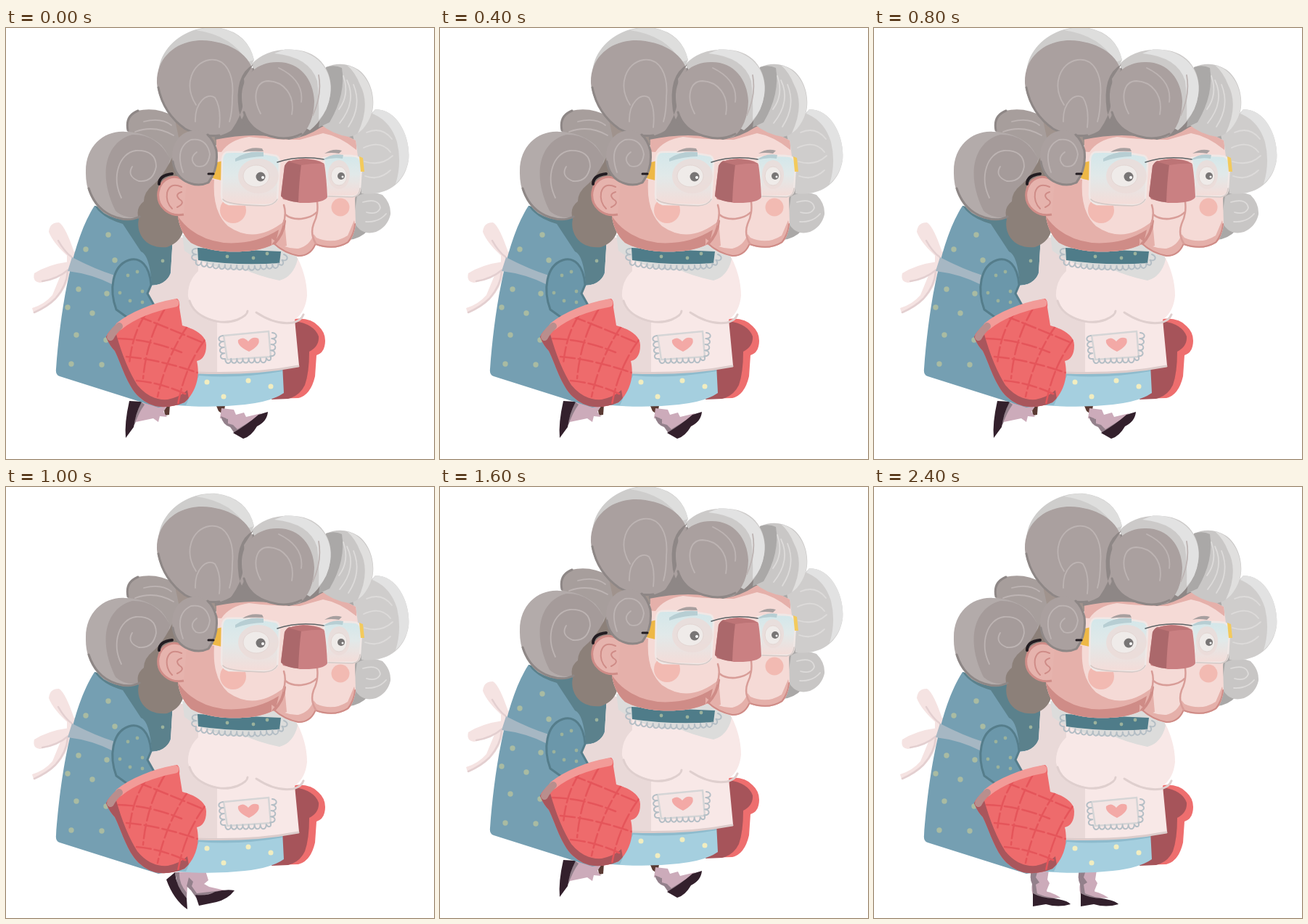
Write an HTML page that moves like this. It is 590 px wide and 594 px high and loops after 4.4 s.

```html
<!DOCTYPE html>
<html lang="en">
<head>
<meta charset="utf-8">
<title>Walking granny</title>
<style>
html, body { margin: 0; width: 100%; height: 100%; overflow: hidden; background: #fff; }
svg { display: block; width: 590px; height: 594px; }
.line { fill: none; stroke-linecap: round; stroke-linejoin: round; }
.curl { stroke: #bdb4b3; stroke-width: 1.8; }
.pale { stroke: #dddbda; stroke-width: 1.8; }
.rim { stroke: #8e8786; stroke-width: 3; }
.shoe { fill: #33202c; }
.sock { fill: #ccabba; }
.sockShade { fill: #93808b; }
.brown { fill: #5a3a33; }
.quilt { stroke: #e5555a; stroke-width: 2.5; stroke-dasharray: 20 5; }
</style>
</head>
<body>
<svg viewBox="0 0 590 594">
<defs>
  <linearGradient id="glass" x2="0" y2="1">
    <stop offset="0" stop-color="#d3e7ea"/>
    <stop offset=".45" stop-color="#e1e9e9"/>
    <stop offset="1" stop-color="#f4dcd8"/>
  </linearGradient>
  <path id="mitt" d="M138 436C146 414 200 390 236 383Q240 386 239 395L243 420C257 424 276 432 276 447Q276 466 263 469C268 490 262 512 246 526Q230 533 213 532Q197 531 183 518C167 503 159 473 150 455Q143 448 138 436Z"/>
  <path id="face" d="M290 158L335 150L440 144L482 165L489 215Q482 230 481 246L482 281Q479 299 472 306Q453 318 427 309Q420 325 403 325Q383 321 369 308C350 318 325 319 302 318Q271 315 255 306Q236 289 236 255L240 210L290 218Z"/>
  <clipPath id="inMitt"><use href="#mitt"/></clipPath>
  <clipPath id="inFace"><use href="#face"/></clipPath>
</defs>

<g id="S">
  <g id="standLeg">
    <path class="sock" d="M217 528H241L239 541L242 546L238 556L240 565H220Q216 555 218 547Q214 539 217 528Z"/>
    <path class="sockShade" d="M217 528H226L223 538L228 545L223 548L225 561H219L218 547Q214 539 217 528Z"/>
    <path class="sock" d="M228 556Q244 557 257 566L224 566Z"/>
    <path class="sockShade" d="M219 557Q235 567 260 567L220 567Z"/>
    <path class="shoe" d="M219 560Q232 567 248 567Q267 570 271 575Q254 580 237 575L219 578Z"/>
  </g>
  <use href="#standLeg" x="66"/>
</g>
<g id="A">
  <path class="brown" d="M217 519H226L225 533L219 534Z"/>
  <path class="sock" d="M184 516L223 520L217 529L222 536L212 535L210 543L203 538L179 543Z"/>
  <path class="sockShade" d="M186 515L191 519Q183 530 178 545L172 554Z"/>
  <path class="shoe" d="M170 514L187 515Q178 533 176 550L165 565Q163 545 170 514Z"/>
  <path class="brown" d="M290 521L302 520L300 533L293 528Z"/>
  <path class="sock" d="M297 524L314 526L317 533L328 530L331 536L352 531L319 558L311 547L304 545L305 538L295 538Z"/>
  <path class="sockShade" d="M296 535L306 539L306 545L313 547L319 553L356 530L316 560L309 550Q299 547 296 535Z"/>
  <path class="shoe" d="M361 529Q360 542 346 549Q338 563 327 566L313 558Q332 547 348 533Z"/>
</g>
<g id="C">
  <path class="sock" d="M190 522L226 520L223 530L225 537L214 534L210 543L205 546L203 565L193 548Z"/>
  <path class="sockShade" d="M190 525L196 524Q194 540 203 554L203 567L191 545Z"/>
  <path class="shoe" d="M178 531L191 525Q190 547 202 563L202 578Q185 565 178 531Z"/>
  <path class="brown" d="M287 525L296 522L298 530L289 531Z"/>
  <path class="sock" d="M285 533L298 527L313 530L309 539L318 543L316 551L336 556L303 567L296 555L290 552L292 544L285 542Z"/>
  <path class="sockShade" d="M285 534L292 533L291 541L299 544L296 552L306 562L330 556L303 566L294 555L289 552L291 544L285 542Z"/>
  <path class="shoe" d="M302 563Q315 564 329 556L354 552Q350 563 337 570L307 578Z"/>
</g>
<g id="B">
  <path class="sock" d="M233 531L275 529L279 542L273 547L280 551L302 556L263 567L256 555L250 551L249 570L239 554Z"/>
  <path class="sockShade" d="M233 531L239 531Q238 546 249 559L249 573L237 551ZM252 538L258 544L256 550L263 560L297 556L262 566L255 556L249 550Z"/>
  <path class="shoe" d="M221 541L233 531Q234 550 249 567L250 582Q231 569 221 541ZM261 562Q277 564 288 558Q303 554 315 556Q306 568 290 572L266 577Z"/>
</g>

<g id="body">
  <!-- bow -->
  <g fill="#f5e3e2">
    <path d="M88 327Q65 307 59 291Q60 278 73 278Q82 283 95 322Z"/>
    <path d="M87 332Q58 336 39 348Q36 360 47 361Q70 357 92 340Z"/>
    <path d="M78 344L88 345Q85 367 70 383Q56 397 38 403L36 396Q53 391 64 378Z"/>
    <path d="M84 322L95 318V340L84 343Z"/>
  </g>
  <path class="line" stroke="#e3cfd0" stroke-width="2.5" d="M72 303Q81 319 91 326M85 345Q84 365 68 383Q57 394 39 402M50 359Q71 356 86 343"/>
  <!-- far mitt -->
  <path fill="#ee6e6e" d="M396 411Q420 408 431 421Q443 432 439 449Q437 458 428 461L426 490Q420 516 403 520L366 521L380 480L401 475Z"/>
  <path fill="#a6545a" d="M398 414Q425 418 431 435Q432 449 418 456Q418 485 412 502Q405 517 389 521L366 522L380 480L402 475Z"/>
  <!-- dress -->
  <path fill="#759fb2" d="M122 255C90 304 75 400 69 480Q68 488 74 490L210 533L265 525L262 420L229 360L230 290Z"/>
  <path fill="#5b818c" d="M122 255Q133 272 161 280L186 318Q198 323 201 364L221 363Q230 350 230 294L165 264Z"/>
  <path fill="#a5cfdf" d="M245 480L381 474L383 513Q366 525 329 529Q285 534 235 530Z"/>
  <path fill="#8ebbcd" d="M247 483Q320 490 381 479V483Q320 494 266 489L248 530L235 530Z"/>
  <path fill="#a6b7c3" d="M91 326Q124 343 150 351L148 364Q119 349 85 345Z"/>
  <!-- apron -->
  <path fill="#f8e8e7" d="M230 297L398 319Q415 350 415 379Q413 401 398 412L404 475Q336 490 258 484L235 440L198 395L195 365Q220 366 227 348Z"/>
  <path fill="#e9d9d8" d="M230 297L265 302V345Q250 359 251 380Q256 406 291 413V485L258 484L235 440L198 395L195 365Q220 366 227 348Z"/>
  <path fill="#dcdcdb" d="M243 295L395 310L402 329Q396 353 377 358Q345 351 330 343Q288 347 246 317Z"/>
  <path fill="#4f7c89" d="M264 313L379 318L377 334Q319 338 265 330Z"/>
  <g class="line" stroke="#dfcfce" stroke-width="3">
    <path d="M253 386C260 410 296 421 319 412Q333 406 333 400M345 402Q372 420 396 416Q407 413 410 405"/>
    <path stroke="#dccccb" d="M264 485Q340 488 403 476"/>
  </g>
  <path fill="#f4e5e4" stroke="#d5d5d6" stroke-width="2.5" d="M300 434L362 428L365 463L305 467Z"/>
  <path fill="#f3a9a6" d="M335 456Q318 448 320 440Q327 434 334 442Q340 434 348 438Q352 447 335 456Z"/>
  <g id="lace" class="line" stroke="#b4bec5" stroke-width="2">
    <path d="M263 314L262 331L294 336L340 338L379 334L383 322"/>
    <path d="M299 434L302 466L364 465L367 430"/>
  </g>
  <!-- arm and near mitt -->
  <path fill="#6b97aa" stroke="#557d8b" stroke-width="3" d="M200 364C198 337 185 325 169 330C146 338 142 371 152 398L170 411L204 392L195 376Z"/>
  <g id="dots"></g>
  <use href="#mitt" fill="#ee6b6c"/>
  <g clip-path="url(#inMitt)">
    <path fill="#a9565c" d="M130 435L152 432Q164 475 181 502Q199 524 223 522Q241 518 250 509L255 539H180Z"/>
    <g class="line quilt">
      <path d="M155 438Q198 439 242 457M166 463Q212 467 264 485M181 407Q218 421 272 444M180 496Q215 499 251 516"/>
      <path d="M193 404Q174 431 170 473M220 395Q194 438 189 493M250 421Q221 463 209 518M274 440Q246 478 237 529"/>
    </g>
  </g>
  <path class="line" stroke="#f29b98" stroke-width="11" d="M156 421C174 406 205 394 233 389"/>
  <path class="line" stroke="#b98e8d" stroke-width="10" d="M144 436Q148 428 156 421"/>
  <!-- back hair -->
  <path fill="#a0938d" d="M180 140L240 125L300 155L250 235H190Z"/>
  <path fill="#a79e9c" d="M168 152Q163 132 181 124Q208 118 232 132L247 203L215 230L190 250Z"/>
  <path fill="#b3abaa" d="M110 207C110 172 136 151 164 153Q192 153 214 171Q236 196 221 222Q200 239 185 270Q159 280 135 265Q109 244 110 207Z"/>
  <path fill="#a59b9a" d="M151 262C125 210 139 166 174 157Q208 156 226 190L220 217Q199 227 182 271Q163 273 151 262Z"/>
  <path fill="#8c8079" d="M231 185Q217 214 203 226Q190 236 190 249Q178 258 183 273Q180 287 188 299Q199 314 222 312Q239 306 244 291L240 210Z"/>
  <path class="line rim" d="M168 151Q164 131 182 124M114 231Q124 262 152 271Q170 277 184 270"/>
  <path class="line curl" d="M159 244C145 215 156 182 179 179Q207 178 207 201Q203 223 183 221Q166 214 174 201M178 153Q205 143 231 158M190 139Q214 133 228 144"/>
  <!-- right hair -->
  <path fill="#aaa8a7" d="M470 130L500 128L494 240L488 262L500 288Q488 301 472 302Z"/>
  <path fill="#c8c6c5" d="M484 242Q500 233 519 240Q531 252 530 267Q526 284 510 291Q494 296 484 284Q479 279 481 262Z"/>
  <path class="line pale" d="M492 250Q514 244 516 258Q512 268 497 264M496 277Q514 278 524 266"/>
  <path fill="#cfcdcc" d="M478 157L509 122C541 122 558 162 555 192C550 225 524 242 490 238L485 190Z"/>
  <path fill="#e2e2e2" d="M509 122C541 122 558 162 555 192Q551 213 537 225Q546 196 539 167Q530 138 505 128Z"/>
  <path class="line pale" d="M497 154Q518 145 532 163M493 175Q517 164 530 181M494 194Q517 201 533 186M495 214Q514 221 530 206"/>
  <!-- face -->
  <use href="#face" fill="#f5dad6"/>
  <g clip-path="url(#inFace)">
    <path fill="#e5b0aa" d="M230 205L287 219Q284 263 306 283Q343 309 384 276L387 310L330 333H230ZM285 180V140H483V178Q460 159 437 155L405 164Q365 164 335 160Q308 164 297 181Z"/>
    <path fill="#cf8c87" d="M236 268Q257 300 300 306Q343 309 376 288L371 309L330 330H240Z"/>
    <path fill="#e5b0aa" d="M366 300Q384 315 403 314Q419 310 424 294L428 299Q451 309 471 296L480 275L490 325H366Z"/>
    <path class="line" stroke="#cf8c87" stroke-width="4" d="M369 308Q383 294 384 276M369 308Q383 321 403 325Q420 325 427 309Q453 318 472 306Q481 294 482 281"/>
  </g>
  <path class="line" stroke="#d89d98" stroke-width="2.5" d="M383 254Q387 266 382 281M385 267Q393 274 407 273Q422 271 428 264M429 250Q431 266 424 280Q419 294 427 307"/>
  <circle cx="313" cy="261" r="18" fill="#f2bab2"/>
  <circle cx="461" cy="257" r="12.5" fill="#f2bab2"/>
  <path fill="#e6b3ad" stroke="#cf8c87" stroke-width="3" d="M249 222C231 208 213 218 210 236C207 257 226 271 245 267"/>
  <path class="line" stroke="#cf8c87" stroke-width="2" d="M242 229Q226 222 222 237Q220 250 229 259M242 236Q232 239 239 246Q248 251 236 257"/>
  <!-- glasses -->
  <path class="line" stroke="#221c21" stroke-width="4" d="M211 225Q211 213 229 211"/>
  <path fill="#eeb846" d="M291 195L299 193L297 220L284 217Z"/>
  <g fill="url(#glass)" stroke="#f0e8e6" stroke-width="2.5">
    <path d="M305 181Q342 180 372 186Q378 188 377 199L374 246Q370 254 357 254L307 253Q297 250 297 240L298 191Q299 182 305 181Z"/>
    <path d="M438 189Q462 184 483 187Q490 190 490 201L488 232Q487 242 477 242L443 242Z"/>
  </g>
  <path class="line" stroke="#d4c8c5" stroke-width="1.5" d="M299 246Q304 254 356 255Q370 254 374 246M444 242L478 243Q487 242 488 231"/>
  <path fill="#f3ca5c" d="M487 187L492 189L494 208L489 208Z"/>
  <g fill="#ecdcd9" opacity=".8">
    <ellipse cx="348" cy="214" rx="28" ry="24"/>
    <ellipse cx="459" cy="212" rx="15" ry="20"/>
  </g>
  <g fill="#efebe9" stroke="#e3d6d3">
    <ellipse cx="345" cy="214" rx="18" ry="15"/>
    <ellipse cx="459" cy="214" rx="11" ry="13"/>
  </g>
  <g fill="#787575">
    <circle cx="351" cy="215" r="6.5"/><circle cx="462" cy="214" r="5"/>
  </g>
  <g fill="#fff">
    <circle cx="354" cy="216" r="2"/><circle cx="464" cy="215" r="1.5"/>
  </g>
  <g fill="#b7ced3">
    <path d="M316 190Q333 178 355 181L355 187Q337 187 316 194ZM437 192Q448 182 465 185L464 190Q451 188 437 192Z"/>
    <path fill="#a79f9f" d="M326 181Q337 173 353 176L355 180Q339 179 326 181ZM439 183Q451 175 463 179L459 183Q448 181 439 183Z"/>
  </g>
  <path class="line" stroke="#5d6467" stroke-width="1.5" d="M374 195Q404 185 438 191"/>
  <path fill="#ca8082" d="M384 200Q387 192 410 190Q433 191 439 198Q442 218 443 243Q438 252 405 251L382 246L379 240Z"/>
  <path fill="#ab686b" d="M384 200Q387 194 391 193L407 198Q404 221 403 250Q389 250 379 242Z"/>
  <path fill="#bd7476" d="M389 194Q413 186 439 197Q425 196 407 199Z"/>
  <!-- front hair -->
  <path fill="#8e8786" d="M285 120L345 60L440 90L445 142L434 147Q415 160 390 164Q345 152 288 164Z"/>
  <path fill="#c9c7c6" d="M441 64Q464 54 485 67C506 81 513 118 499 139Q489 157 473 160Q451 157 434 143Z"/>
  <path fill="#aaa8a7" d="M441 64Q453 60 463 65Q469 101 446 140L431 147Z"/>
  <path fill="#e0dfde" d="M470 61C504 70 514 115 499 139Q493 150 485 155Q503 116 488 88Q482 72 470 61Z"/>
  <path class="line pale" d="M470 82Q484 111 460 141M479 88Q491 117 472 146M465 76Q474 102 459 122"/>
  <path fill="#cccac9" d="M338 60Q360 37 398 40C434 42 452 72 447 102Q442 132 419 151L380 130Z"/>
  <path fill="#e2e2e2" d="M385 39C430 39 452 70 447 102Q444 124 431 137Q432 108 429 83Q419 50 370 45Z"/>
  <path fill="#cecdcc" d="M210 73C211 35 250 6 290 9Q333 15 342 54L325 87L230 65Z"/>
  <path fill="#dededd" d="M262 13Q280 7 295 10Q334 19 342 54L333 57Q312 20 262 13Z"/>
  <path fill="#aaa09f" d="M208 86C207 49 237 27 270 27C306 28 334 45 340 68Q326 91 329 126Q322 153 288 160C250 162 211 127 208 86Z"/>
  <path class="line rim" d="M210 92Q217 128 247 149Q270 161 294 158"/>
  <path fill="#8e8786" d="M341 60Q314 75 321 124Q326 146 342 155L305 158Q334 125 328 80Z"/>
  <path fill="#aaa09f" d="M325 107C324 74 348 57 373 57C405 56 424 81 425 111Q424 144 405 160Q386 165 365 160C342 153 326 134 325 107Z"/>
  <path class="line rim" d="M328 126Q335 151 364 159Q388 166 407 156"/>
  <path class="line curl" d="M262 116C244 88 257 58 280 54C303 51 315 74 312 105Q312 126 308 139M261 139C260 113 277 98 288 106Q297 120 294 147M351 128C339 106 344 83 362 83C382 84 399 101 394 129M376 65Q411 82 407 112M431 75Q436 102 423 130"/>
  <path fill="#aaa09f" d="M229 187C229 164 245 150 265 151Q284 157 291 180Q293 207 279 224Q259 230 244 219Q229 206 229 187Z"/>
  <path class="line rim" d="M230 194Q233 213 247 221Q264 230 279 223Q293 204 290 179Q286 164 278 157"/>
  <path class="line curl" d="M244 209Q232 175 255 164Q277 161 281 184Q278 205 262 200Q251 190 263 181"/>
  <path class="line" stroke="#221c21" stroke-width="3" d="M279 211H286"/>
</g>
</svg>
<script>
const $ = id => document.getElementById(id);
const NS = "http://www.w3.org/2000/svg";

// Lace: outward scallops along each guide line.
for (const path of $("lace").querySelectorAll("path")) {
  const count = Math.round(path.getTotalLength() / 8);
  const at = i => path.getPointAtLength(i * path.getTotalLength() / count);
  let d = "";
  for (let i = 0; i < count; i++) {
    const p = at(i), q = at(i + 1), dx = q.x - p.x, dy = q.y - p.y;
    d += `M${p.x} ${p.y}C${p.x - dy} ${p.y + dx} ${q.x - dy} ${q.y + dx} ${q.x} ${q.y}`;
  }
  path.setAttribute("d", d);
}

function spots(list, r, fill) {
  for (const [cx, cy] of list) {
    const el = document.createElementNS(NS, "circle");
    for (const [key, value] of Object.entries({ cx, cy, r, fill })) el.setAttribute(key, value);
    $("dots").append(el);
  }
}
spots([[141, 295], [110, 315], [150, 330], [100, 370], [85, 395], [119, 403], [97, 433],
  [138, 440], [90, 473], [132, 474], [139, 376]], 3.7, "#a9bba2");
spots([[168, 351], [181, 346], [157, 375], [171, 386], [188, 373], [188, 388], [216, 331], [305, 325],
  [341, 327], [360, 321]], 2.4, "#9bb29c");
spots([[277, 498], [300, 518], [334, 496], [365, 504]], 3.5, "#f1edc0");

// One letter per 200 ms step: A and C stride, B and T cross, S stands.
const STEPS = "ABABABASASCT", LOOP = 4400;

function draw(now) {
  const pose = STEPS[Math.floor(now % LOOP / 200)] || "S";
  const legs = pose === "T" ? "B" : pose;
  for (const id of "ABCS") $(id).style.display = id === legs ? "" : "none";
  $("B").setAttribute("transform", `translate(${pose === "T" ? -18 : 0} 0)`);
  $("body").setAttribute("transform", `translate(0 ${"AC".includes(pose) ? -10 : 0})`);
}

const start = performance.now();
(function tick() {
  draw(performance.now() - start);
  requestAnimationFrame(tick);
})();
</script>
</body>
</html>
```
